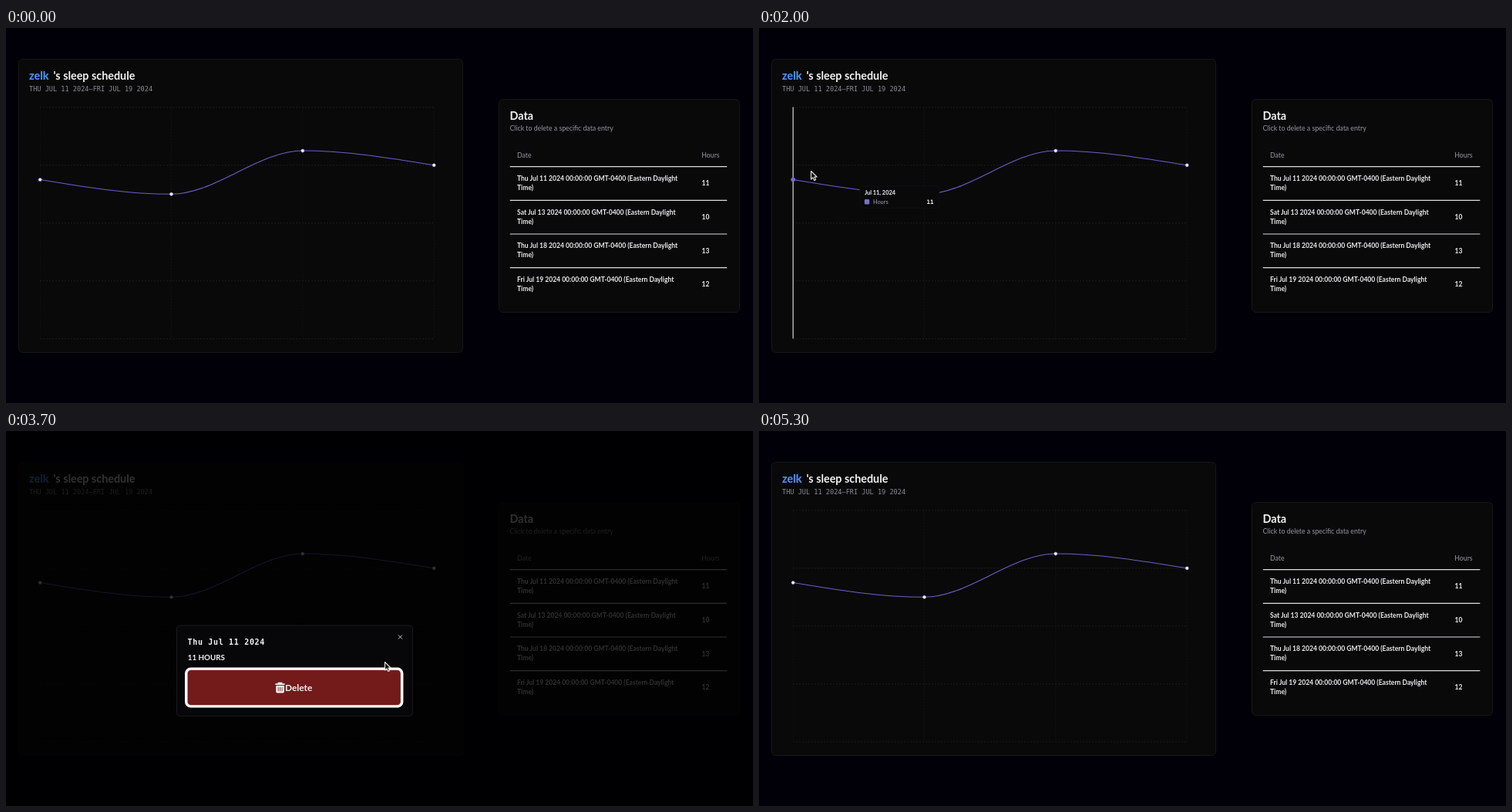
An HTML page for the animation above (5.4 s loop, 969 px wide and 486 px high).

```html
<!DOCTYPE html>
<html lang="en">
<head>
<meta charset="utf-8">
<title>Sleep schedule</title>
<style>
html, body { margin: 0; width: 100%; height: 100%; overflow: hidden; background: #010009; }
svg { display: block; width: 969px; height: 486px; }
text { font-family: Lato, "Open Sans", sans-serif; fill: #f4f4f5; white-space: pre; }
.mono { font-family: "DejaVu Sans Mono", monospace; }
.head { font-size: 14.35px; font-weight: 700; }
.cell { font-size: 8.55px; font-weight: 700; fill: #ececee; }
.note { font-size: 8.75px; fill: #98989f; }
.tip { font-size: 7.4px; }
.card { fill: #09090a; stroke: #161618; }
</style>
</head>
<body>
<svg id="stage" viewBox="0 0 969 486">
  <rect width="969" height="486" fill="#010009"/>

  <rect class="card" x="16.5" y="40.5" width="576" height="380" rx="5"/>
  <text class="head" x="30" y="66.5" style="font-weight:800;fill:#4f8ff2">zelk</text>
  <text class="head" x="61.5" y="66.5">'s sleep schedule</text>
  <text class="mono" x="30" y="81.7" font-size="8.58" style="fill:#8b8b91">THU JUL 11 2024—FRI JUL 19 2024</text>
  <g id="grid" stroke="#222225" stroke-width=".8" stroke-dasharray="2 2"></g>
  <path id="curve" fill="none" stroke="#6c60c2" stroke-width="1.05"/>
  <g id="dots" fill="#f6f5ff" stroke="#8d82dc" stroke-width=".5"></g>
  <g id="active">
    <path d="M0 102.5V402.5" stroke="#c4c4c6" stroke-width="1.3"/>
    <circle id="mark" r="2.8" fill="#7569cc"/>
  </g>
  <g id="tip">
    <rect width="102.5" height="28.5" rx="3" fill="#09090a" stroke="#141417" stroke-width=".7"/>
    <text id="tipDate" class="tip" x="6" y="11" font-weight="700"></text>
    <rect x="6" y="17.3" width="6.3" height="6.3" rx="1.2" fill="#7a70cf"/>
    <text class="tip" x="17" y="23.2" style="fill:#a1a1aa">Hours</text>
    <text id="tipHours" class="tip mono" x="95.5" y="23.2" font-weight="700" text-anchor="end"></text>
  </g>

  <rect class="card" x="639.5" y="92.5" width="312" height="276" rx="5"/>
  <text class="head" x="653.5" y="118.6">Data</text>
  <text class="note" x="653.5" y="133">Click to delete a specific data entry</text>
  <text class="note" x="663" y="167.7">Date</text>
  <text class="note" x="902.3" y="167.7">Hours</text>
  <rect id="hover" x="654" y="180" width="282" height="43" fill="#17171a"/>
  <g id="rows"></g>

  <rect id="shade" width="969" height="486" fill="#000"/>

  <g id="dialog">
    <rect x="221.5" y="252" width="306" height="117.5" rx="4" fill="#07070a" stroke="#18181b"/>
    <text class="mono" x="235.5" y="277" font-size="10" font-weight="600" letter-spacing=".68">Thu Jul 11 2024</text>
    <text x="235.8" y="296.6" font-size="9.8" font-weight="700">11 HOURS</text>
    <rect x="235.3" y="309.7" width="276.6" height="45.8" rx="5" fill="#731a1a" stroke="#9a5a5a" stroke-width=".9"/>
    <rect id="ring" x="233.7" y="308.1" width="280" height="48.8" rx="6" fill="none" stroke="#fff" stroke-width="3.4"/>
    <g stroke="#f4f4f5">
      <path d="M349.4 328.2H361.6M353.5 328V326.6H357.5V328" fill="none" stroke-width="1.8"/>
      <path d="M350.8 330.4H360.4V338.2Q360.4 339 359.6 339H351.6Q350.8 339 350.8 338.2Z" fill="#f4f4f5" stroke-width="1"/>
      <path d="M353.2 332V337.4M355.6 332V337.4M358 332V337.4" stroke="#731a1a" stroke-width=".9"/>
    </g>
    <text x="362" y="336.8" font-size="11.9" font-weight="700">Delete</text>
    <path d="M508.9 264.4L514 269.5M514 264.4L508.9 269.5" stroke="#c9c9cc" stroke-width="1"/>
    <rect id="closeRing" x="504.5" y="260" width="14.2" height="15" rx="3" fill="none" stroke="#f4f4f5" stroke-width="1.7"/>
  </g>

  <g id="pointer" stroke-linejoin="round">
    <path id="arrow" d="M.5 .5V11L2.9 8.8 4.7 12.6 6.6 11.7 4.9 8.1 8.1 8Z" fill="#111" stroke="#e6e6e6" stroke-width="1.1"/>
    <path id="hand" d="M-1 1Q0 -.6 1 1V5L4.2 5.8Q5.4 6.2 5.2 7.8L4.4 12H-1.2L-3.8 8.4Q-4 6.8 -2.4 7.2L-1 8.2Z" fill="#f2f2f2" stroke="#111" stroke-width=".7"/>
  </g>
</svg>
<script>
const LOOP = 5400, STEP = 100;
const $ = id => document.getElementById(id);
const show = (id, on) => $(id).setAttribute('display', on ? 'inline' : 'none');
const move = (id, x, y) => $(id).setAttribute('transform', `translate(${x} ${y})`);
const clamp = v => Math.max(0, Math.min(1, v));

const days = [
  { x: 44.2, date: 'Thu Jul 11', hours: 11 },
  { x: 214.5, date: 'Sat Jul 13', hours: 10 },
  { x: 384.8, date: 'Thu Jul 18', hours: 13 },
  { x: 555.2, date: 'Fri Jul 19', hours: 12 }
];
days.forEach(d => { d.y = 402.8 - d.hours * 18.75; });

// pointer stops: time, x, y
const stops = [
  [300, 330, 500], [400, 335, 490], [600, 348, 445], [800, 362, 400],
  [900, 345, 360], [1000, 325, 290], [1100, 214, 207], [1400, 212, 209],
  [1700, 205, 208], [1900, 150, 206], [2000, 67, 185], [2300, 60, 186],
  [2500, 160, 190], [2700, 400, 195], [2800, 540, 198], [2900, 650, 201],
  [3000, 712, 204], [3200, 716, 204], [3400, 650, 232], [3700, 491, 299],
  [4300, 497, 295], [4600, 510, 267], [4800, 511, 267], [4900, 525, 330],
  [5000, 545, 412], [5100, 560, 500]
];

function pointerAt(t) {
  const i = stops.findIndex(s => s[0] > t);
  if (i < 1) return null;
  const [t0, x0, y0] = stops[i - 1], [t1, x1, y1] = stops[i];
  const k = (t - t0) / (t1 - t0);
  return { x: x0 + (x1 - x0) * k, y: y0 + (y1 - y0) * k };
}

const dialogAt = t => clamp((t - 3120) / 200) * clamp(1 - (t - 4720) / 200);

function dayUnder(t) {
  const p = pointerAt(t);
  if (!p || dialogAt(t) > 0 || p.x < 40 || p.x > 560 || p.y < 102 || p.y > 403) return null;
  return days.reduce((a, b) => Math.abs(b.x - p.x) < Math.abs(a.x - p.x) ? b : a);
}

// the tooltip trails behind the hovered day
const trail = [];
for (let t = 0, pos = null; t < LOOP; t += STEP) {
  const day = dayUnder(t), p = pointerAt(t);
  if (!day) pos = null;
  else if (!pos) pos = { x: p.x, y: p.y };
  else {
    const tx = day.x + (day.x > 480 ? -113 : 10), ty = p.y + 10;
    pos = { x: pos.x + (tx - pos.x) * .55, y: pos.y + (ty - pos.y) * .55 };
  }
  trail.push(pos);
}

function build() {
  let grid = '';
  for (let i = 0; i < 5; i++) grid += `<path d="M44 ${102.8 + i * 75}H555.5"/>`;
  days.forEach(d => { grid += `<path d="M${d.x} 102.8V402.8" opacity=".5"/>`; });
  $('grid').innerHTML = grid;

  const slope = (a, b) => 1.5 * (b.y - a.y) / (b.x - a.x);
  const tangent = [slope(days[0], days[1]), 0, 0, slope(days[2], days[3])];
  let d = `M${days[0].x} ${days[0].y}`;
  for (let i = 1; i < days.length; i++) {
    const a = days[i - 1], b = days[i], h = (b.x - a.x) / 3;
    d += `C${a.x + h} ${a.y + h * tangent[i - 1]} ${b.x - h} ${b.y - h * tangent[i]} ${b.x} ${b.y}`;
  }
  $('curve').setAttribute('d', d);
  $('dots').innerHTML = days.map(d => `<circle cx="${d.x}" cy="${d.y}" r="2.1"/>`).join('');

  $('rows').innerHTML = days.map((d, i) => {
    const y = 179.7 + i * 43.65;
    return `<path d="M653.7 ${y}H935.3" stroke="#dededf" stroke-width="1.2"/>
      <text class="cell" x="663" y="${y + 18.3}">${d.date} 2024 00:00:00 GMT-0400 (Eastern Daylight</text>
      <text class="cell" x="663" y="${y + 30.3}">Time)</text>
      <text class="cell" x="902.5" y="${y + 24.5}">${d.hours}</text>`;
  }).join('');
}

function draw(t) {
  const p = pointerAt(t), day = dayUnder(t), open = dialogAt(t);

  show('active', day);
  show('tip', day);
  if (day) {
    move('active', day.x, 0);
    $('mark').setAttribute('cy', day.y);
    const pos = trail[t / STEP];
    move('tip', pos.x, pos.y);
    $('tipDate').textContent = day.date.slice(4) + ', 2024';
    $('tipHours').textContent = day.hours;
  }

  show('hover', t >= 3000 && t < 3500);
  $('shade').setAttribute('opacity', open * .8);
  show('dialog', open > 0);
  $('dialog').setAttribute('opacity', open);
  const s = .95 + .05 * open;
  $('dialog').setAttribute('transform',
    `translate(374 ${310.7 + 2 * (1 - open)}) scale(${s}) translate(-374 -310.7)`);
  show('ring', t >= 3300 && t < 4600);
  show('closeRing', t >= 4600);

  show('pointer', p);
  if (p) move('pointer', p.x, p.y);
  const hand = t >= 4600 && t <= 4800;
  show('hand', hand);
  show('arrow', !hand);
}

build();
const start = performance.now();
function tick() {
  const t = (performance.now() - start) % LOOP;
  draw(Math.floor(t / STEP) * STEP);
  requestAnimationFrame(tick);
}
tick();
</script>
</body>
</html>
```
